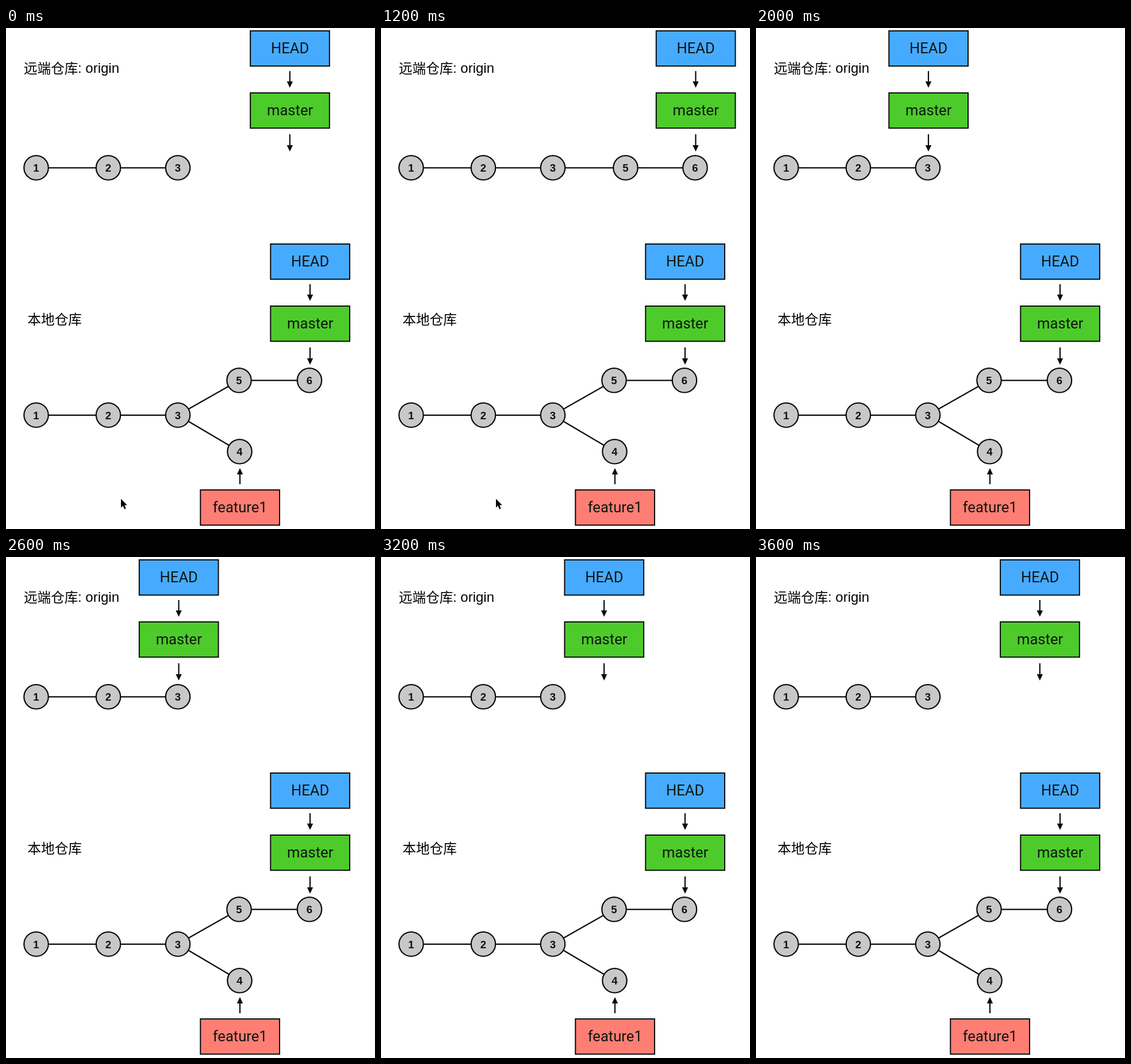
Recreate the animation shown at these times as an HTML page. Size 642x872 px, loop 3800 ms.

```html
<!DOCTYPE html>
<html lang="zh">
<head>
<meta charset="utf-8">
<style>
  html, body { margin: 0; width: 100%; height: 100%; overflow: hidden; background: #fff; }
  svg { display: block; width: 100%; height: 100%; }
  .box { stroke: #0a0a0a; stroke-width: 2; }
  .label { font: 25.6px Roboto, sans-serif; text-anchor: middle; fill: #101510; }
  .cjk { font: 23.6px "Noto Sans CJK SC", "Noto Sans CJK", sans-serif; }
  .latin { font: 24px "Liberation Sans", Arial, sans-serif; }
  .link, .shaft { stroke: #0a0a0a; stroke-width: 2.2; }
  .node circle { fill: #c8c8c8; stroke: #0a0a0a; stroke-width: 2.2; }
  .node text { font: bold 18.5px "Liberation Sans", Arial, sans-serif; text-anchor: middle; fill: #111; }
</style>
</head>
<body>
<svg viewBox="0 0 642 872">
  <text class="cjk" x="31" y="78.5">远端仓库</text>
  <text class="latin" x="125" y="78">: origin</text>
  <text class="cjk" x="37.5" y="515.5">本地仓库</text>
  <g id="pushed"></g>
  <g id="graph"></g>
  <g id="remote"></g>
  <g id="local" transform="translate(529 371)"></g>
  <g id="feature" transform="translate(407 0)"></g>
  <path id="cursor" d="M0 0V15.2L3.5 12L6 18L8.7 16.9L6.2 11.1H10.8Z" fill="#000" stroke="#fff" stroke-width="1" paint-order="stroke"/>
</svg>
<script>
const LOOP = 3800, STEP = 200, RESET = 2000;
const BLUE = '#46abff', GREEN = '#4dcb2b', CORAL = '#ff7e74';
const $ = id => document.getElementById(id);
const add = (id, markup) => $(id).insertAdjacentHTML('beforeend', markup);

// Boxes and arrows are centred on their group's axis
const box = (y, fill, text) =>
  `<rect class="box" x="-68.7" y="${y}" width="137.7" height="61.3" fill="${fill}"/>
   <text class="label" x="0.2" y="${y + 39}">${text}</text>`;

const arrow = (tail, tip) => {
  const neck = tip - Math.sign(tip - tail) * 11;
  return `<line class="shaft" x1="0" x2="0" y1="${tail}" y2="${neck}"/>
    <path d="M-5.2 ${neck}H5.2L0 ${tip}Z" fill="#0a0a0a"/>`;
};

const link = ([x1, y1], [x2, y2]) =>
  `<line class="link" x1="${x1}" y1="${y1}" x2="${x2}" y2="${y2}"/>`;

const node = ([x, y], n) =>
  `<g class="node"><circle cx="${x}" cy="${y}" r="21.2"/>
   <text x="${x}" y="${y + 6.8}">${n}</text></g>`;

// Links come as digit pairs, nodes as a string of digits
const graph = (id, points, links, shown) => add(id,
  links.map(([a, b]) => link(points[a], points[b])).join('') +
  [...shown].map(n => node(points[n], n)).join(''));

const trunk = y => ({ 1: [52.5, y], 2: [178, y], 3: [299, y] });
const remoteY = 243.3, localY = 673.8, branchY = 613.3;
const remote = { ...trunk(remoteY), 5: [425.5, remoteY], 6: [546.5, remoteY] };
const local = { ...trunk(localY), 4: [406.5, 737.3], 5: [405.5, branchY], 6: [528, branchY] };

graph('pushed', remote, ['35', '56'], '56');
graph('graph', remote, ['12', '23'], '123');
graph('graph', local, ['12', '23', '35', '34', '56'], '123456');

const pointer = box(5, BLUE, 'HEAD') + arrow(75, 104) + box(113, GREEN, 'master') + arrow(185, 215);
add('remote', pointer);
add('local', pointer);
add('feature', arrow(794, 766) + box(804, CORAL, 'feature1'));

const clamp = u => Math.min(1, Math.max(0, u));
const ease = u => u * u * u * (10 - 15 * u + 6 * u * u);

function draw(t) {
  // The loop opens six steps into the push, holding the pose it closed on
  const step = Math.floor(t / STEP) + (t < RESET ? 6 : -12);
  const x = 300 + 247.5 * ease(clamp(0.12 * step - 0.058));
  $('remote').setAttribute('transform', `translate(${x} 0)`);
  $('pushed').setAttribute('opacity', clamp((step - 6) / 2));

  const leaving = t >= RESET - STEP;
  $('cursor').setAttribute('visibility', t < RESET ? 'visible' : 'hidden');
  $('cursor').setAttribute('transform', leaving ? 'translate(58 832)' : 'translate(200 819.5)');
}

const start = performance.now();
function tick() {
  draw((performance.now() - start) % LOOP);
  requestAnimationFrame(tick);
}
tick();
</script>
</body>
</html>
```
